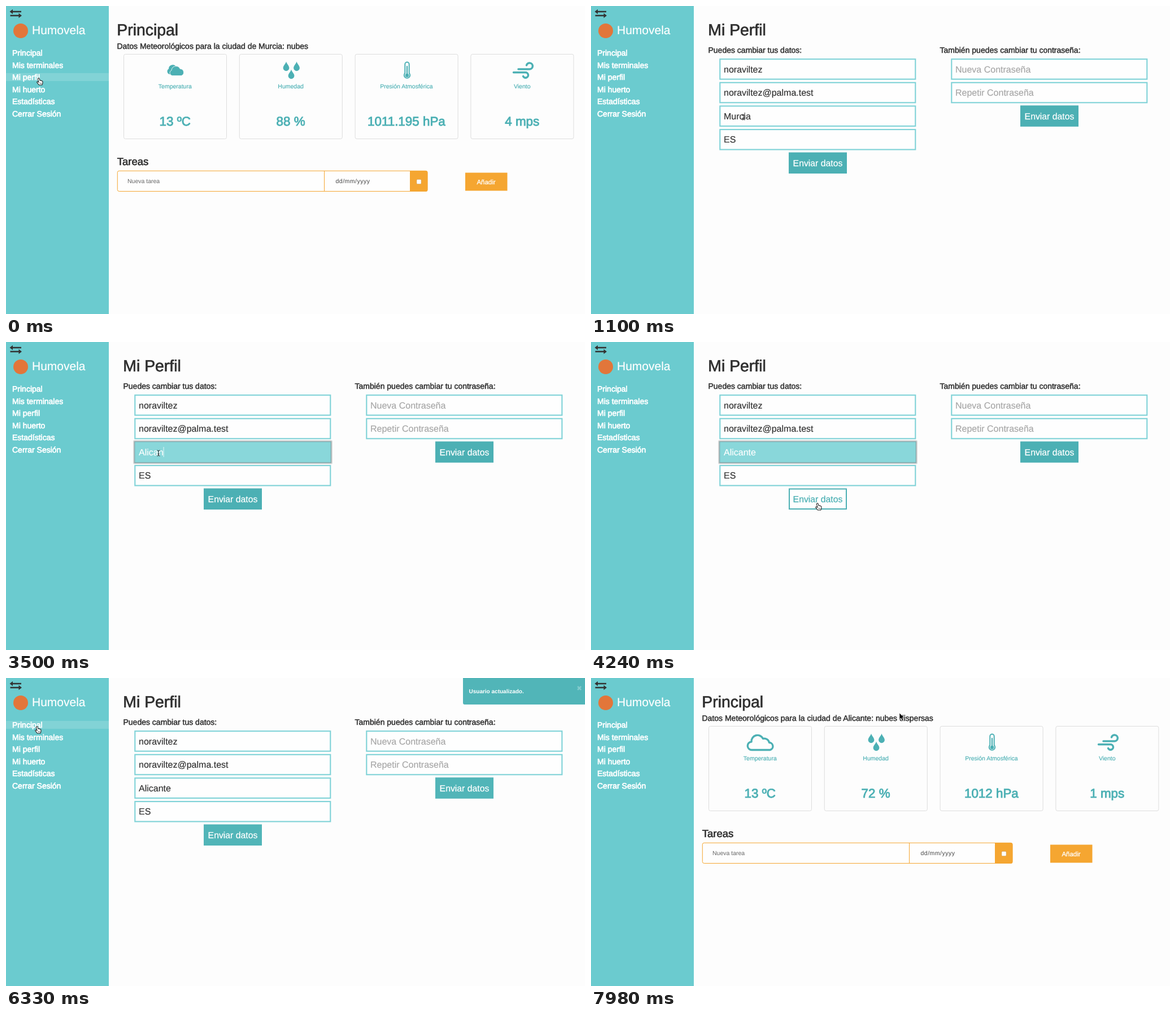
An HTML page for the animation above (8000 ms loop, 1025 by 546 pixels).

```html
<!DOCTYPE html>
<html lang="es">
<head>
<meta charset="utf-8">
<title>Panel</title>
<style>
  html, body { margin: 0; width: 100%; height: 100%; overflow: hidden; background: #fdfdfd; }
  svg { display: block; width: 100vw; height: 100vh; }
  text { font-family: "Liberation Sans", Arial, sans-serif; white-space: pre; text-rendering: geometricPrecision; }
</style>
</head>
<body>
<svg id="stage" viewBox="0 0 1025 546"></svg>
<script>
const LOOP = 8000;
const TEAL = '#4cb0b4', ORANGE = '#f5a631', DARK = '#2f2f2f', EDGE = '#7fd2d7';
const stage = document.getElementById('stage');
const pen = document.createElement('canvas').getContext('2d');
pen.font = '16px "Liberation Sans", Arial, sans-serif';

// Cursor stops: time, x, y, shape
const CURSOR = [
  [0, 54, 127, 'hand'],
  [510, 72, 134, 'arrow'], [660, 122, 149, 'arrow'], [810, 190, 169, 'arrow'],
  [950, 246, 189, 'beam'], [1100, 270, 197, 'beam'],
  [3640, 279, 206, 'beam'], [3790, 310, 240, 'beam'], [3940, 340, 261, 'arrow'],
  [4090, 385, 279, 'hand'], [4240, 397, 285, 'hand'],
  [5590, 345, 240, 'arrow'], [5740, 255, 152, 'arrow'], [5890, 165, 74, 'arrow'],
  [6040, 102, 33, 'arrow'], [6180, 64, 62, 'arrow'], [6330, 51, 85, 'hand'],
  [7530, 62, 82, 'hand'], [7680, 170, 70, 'arrow'], [7830, 390, 58, 'arrow'],
  [7980, 546, 62, 'arrow']
];
const SHAPES = {
  arrow: '<path d="M0 0V11.6L2.7 9.1L4.7 13.6L6.8 12.7L4.9 8.3H8.6Z" fill="#000" stroke="#fff" stroke-width=".7"/>',
  hand: '<path d="M3 1.3Q4.3 .2 5 1.6L6 5Q7.4 4.4 7.9 5.4Q9.2 4.9 9.6 6Q10.8 5.8 10.9 7.2V9.8L9.8 13H4.4L1 8.7Q.4 7.2 1.8 7.1L4 8.2L2.4 2.6Q2.2 1.8 3 1.3Z" fill="#fff" stroke="#222" stroke-width="1.1"/><path d="M6.3 9v2.4M8.3 9v2.4" stroke="#222" stroke-width=".7"/>',
  beam: '<path d="M-2.5 -5Q0 -5 0 -3.5Q0 -5 2.5 -5M0 -4V4M-2.5 5Q0 5 0 3.5Q0 5 2.5 5M-1.5 1.5H1.5" fill="none" stroke="#222"/>'
};

const last = (list, t) => list.filter(k => k[0] <= t).pop();

function rect(x, y, w, h, fill, extra = '') {
  return `<rect x="${x}" y="${y}" width="${w}" height="${h}" fill="${fill}" ${extra}/>`;
}
// heavy: stroke width that thickens the regular face
function text(s, x, y, size, fill, { heavy = 0, mid = false, extra = '' } = {}) {
  return `<text x="${x}" y="${y}" font-size="${size}" fill="${fill}"` +
    (heavy ? ` stroke="${fill}" stroke-width="${heavy}"` : '') +
    (mid ? ' text-anchor="middle"' : '') + ` ${extra}>${s}</text>`;
}

function sidebar(hover) {
  const items = ['Principal', 'Mis terminales', 'Mi perfil', 'Mi huerto', 'Estadísticas', 'Cerrar Sesión'];
  return rect(0, 0, 182, 546, '#6bcbcf') +
    '<path d="M6.500 10L12 5.800V8.7H27V11.3H12V14.2ZM28 17L22.500 12.800V15.7H7.500V18.3H22.500V21.2Z" fill="#333"/>' +
    '<circle cx="26" cy="44" r="13" fill="#e2763a"/>' +
    text('Humovela', 46, 50, 21, '#fff', { heavy: .2 }) +
    (hover >= 0 ? rect(0, 76 + 21.5 * hover, 182, 14, '#82d3d6') : '') +
    items.map((s, i) => text(s, 11, 88 + 21.5 * i, 14, '#fff', { heavy: .7 })).join('');
}

const drop = (x, y) =>
  `<path transform="translate(${x} ${y})" d="M0 0C1 4 5.4 7.5 5.4 11.3A5.4 5.4 0 0 1 -5.4 11.3C-5.4 7.5 -1 4 0 0Z" fill="${TEAL}"/>`;
const line = (d, w) =>
  `<path d="${d}" fill="none" stroke="${TEAL}" stroke-width="${w}" stroke-linecap="round" stroke-linejoin="round"/>`;

const ICONS = {
  clouds: `<path d="M289.500 121A5.200 5.200 0 0 1 288 111.500A7.200 7.200 0 0 1 301.500 108V121Z" fill="${TEAL}"/>` +
    `<path d="M294 123.500A5 5 0 0 1 293 114A8 8 0 0 1 308.300 111.500A6.200 6.200 0 0 1 310.500 123.500Z" fill="${TEAL}" stroke="#fdfdfd" stroke-width=".8"/>`,
  cloud: line('M285 127.500A7.200 7.200 0 0 1 284 113A10.800 10.800 0 0 1 304.500 107.500A9 9 0 0 1 315.500 114.500A6.600 6.600 0 0 1 317 127.500Z', 3.4),
  drops: drop(496, 98.5) + drop(514.500, 98.5) + drop(505, 112.5),
  thermo: line('M706.300 119V103.200A3.700 3.700 0 0 1 713.700 103.200V119A5.200 5.200 0 1 1 706.300 119Z', 2) +
    `<circle cx="710" cy="123" r="3.300" fill="${TEAL}"/>` + line('M710 107V122', 2.2),
  wind: line('M907 112H926.500A5.500 5.500 0 1 0 921.500 105', 3.5) +
    line('M898.500 117.800H919.500A4.700 4.700 0 1 1 915.500 124.500', 3.5)
};

function card(i, h, icon, label, value) {
  const x = 208.5 + 204.8 * i, cx = x + 90.8;
  return rect(x, 85.5, 182, h, '#fdfdfd', 'rx="3" stroke="#ddd"') +
    (icon ? ICONS[icon] : '') +
    text(label, cx, icon ? 146 : 104, 10.5, TEAL, { heavy: .15, mid: true }) +
    (value ? text(value, cx, 211.5, 22.4, TEAL, { heavy: .9, mid: true }) : '');
}

function tasks(dy) {
  return `<g transform="translate(0 ${dy})">` +
    text('Tareas', 196.800, 281.5, 18.5, DARK, { heavy: .65 }) +
    rect(197.3, 292.3, 548.5, 36.2, '#fefefe', `rx="3" stroke="${ORANGE}"`) +
    `<path d="M563.500 292V329" stroke="${ORANGE}"/>` +
    `<path d="M715 292H743Q746.500 292 746.500 295V326Q746.500 329 743 329H715Z" fill="${ORANGE}"/>` +
    rect(727, 307.5, 8, 8, '#fff', 'rx="1.5" stroke="#bda27a" stroke-width=".5"') +
    text('Nueva tarea', 215, 314, 10.5, '#666') +
    text('dd/mm/yyyy', 583.500, 314, 10.5, '#444', { extra: 'letter-spacing=".5"' }) +
    rect(813, 295.5, 74.5, 32, ORANGE) +
    text('Añadir', 850, 315.500, 11.5, '#fff', { heavy: .3, mid: true }) + '</g>';
}

const title = (s, x) => text(s, x, 52, 28.4, DARK, { heavy: .7 });
const caption = (s, x, y) => text(s, x, y, 14, DARK, { heavy: .5 });

function home(city, sky, values, icon) {
  const full = values.length > 0, h = full ? 150 : 118;
  return title('Principal', 196.3) +
    caption(`Datos Meteorológicos para la ciudad de ${city}: ${sky}`, 196.5, 76) +
    card(0, full ? 150 : 75.5, icon, 'Temperatura', values[0]) +
    card(1, h, 'drops', 'Humedad', values[1]) +
    card(2, h, 'thermo', 'Presión Atmosférica', values[2]) +
    card(3, h, 'wind', 'Viento', values[3]) +
    tasks(full ? 0 : -32);
}

const ring = (x, y, w, h) =>
  rect(x - 1, y - 1, w + 2, h + 2, 'none', 'rx="1" stroke="#999" stroke-opacity=".35" stroke-width="3"') +
  rect(x, y, w, h, 'none', 'stroke="#8fa9ab" stroke-width="1.500"');

function field(x, row, s, ink) {
  const y = 94.2 + 41.6 * row;
  return rect(x, y, 346, 35.5, '#fefefe', `stroke="${EDGE}" stroke-width="2.1"`) +
    text(s, x + 6.700, y + 23.300, 16, ink, { heavy: .15 });
}
function button(x, y, fill, hover, focus) {
  return (hover ? rect(x + 1, y + 1, 101, 35.500, '#fefefe', `stroke="${TEAL}" stroke-width="2"`)
                : rect(x, y, 103, 37.5, fill)) +
    (focus ? ring(x, y, 103, 37.5) : '') +
    text('Enviar datos', x + 51.5, y + 24.700, 15.8, hover ? TEAL : '#fff', { heavy: .25, mid: true });
}

function cityField(t) {
  const typed = 'Alicante'.slice(0, t < 2900 ? 1 : 2 + Math.floor((t - 2895) / 149));
  const value = t < 2300 ? 'Murcia' : typed;
  if (t < 1400 || t >= 4690) return field(228.300, 2, value, DARK);
  const x = 235, end = pen.measureText(value).width, half = t < 1550;
  const caret = (t >= 2300 && t < 2600) || (t >= 2900 && t < 4090);
  return rect(228, 177, 347, 36.5, half ? '#c0e9eb' : '#89d7da', `stroke="${EDGE}" stroke-width="2"`) +
    ring(227.500, 176.5, 348, 37.5) +
    (!half && t < 2300 ? rect(x, 186, end, 18, '#a9cfee') : '') +
    text(value, x, 200.7, 16, half ? '#777' : '#fff', { heavy: .15 }) +
    (caret ? rect(x + end, 186, 1, 18, '#e6f7f7') : '');
}

function profile(t) {
  const done = t >= 5140, fill = done ? '#51b5b8' : TEAL;
  return title('Mi Perfil', 207.3) +
    caption('Puedes cambiar tus datos:', 207.5, 83) +
    caption('También puedes cambiar tu contraseña:', 617.500, 83) +
    field(228.300, 0, 'noraviltez', DARK) +
    field(228.300, 1, 'noraviltez@palma.test', DARK) +
    field(228.300, 3, 'ES', DARK) + cityField(t) +
    button(350, 259.5, fill, t >= 4090 && !done, t >= 4690 && !done) +
    field(638.300, 0, 'Nueva Contraseña', '#a5a5a5') +
    field(638.300, 1, 'Repetir Contraseña', '#a5a5a5') +
    button(760, 176.3, fill) +
    (done ? rect(809, -4, 220, 51, fill, 'rx="3"') +
      text('Usuario actualizado.', 819.500, 26.5, 10, '#fff', { extra: 'font-weight="700"' }) +
      '<path d="M1012 15L1018 21M1018 15L1012 21" stroke="#82cbcd" stroke-width="2.500"/>' : '');
}

function scene(t) {
  const [, cx, cy, shape] = last(CURSOR, t);
  const hover = last([[0, 2], [150, -1], [6330, 0], [7080, -1], [7530, 0], [7680, -1]], t)[1];
  const page =
    t < 150 ? home('Murcia', 'nubes', ['13 ºC', '88 %', '1011.195 hPa', '4 mps'], 'clouds') :
    t < 7080 ? profile(t) :
    t < 7380 ? home('Alicante', '', []) :
    home('Alicante', 'nubes dispersas', ['13 ºC', '72 %', '1012 hPa', '1 mps'], 'cloud');
  return rect(0, 0, 1025, 546, '#fdfdfd') + sidebar(hover) + page +
    `<g transform="translate(${cx} ${cy})">${SHAPES[shape]}</g>`;
}

let shown = '';
const start = performance.now();
function tick() {
  const next = scene((performance.now() - start) % LOOP);
  if (next !== shown) stage.innerHTML = shown = next;
  requestAnimationFrame(tick);
}
tick();
</script>
</body>
</html>
```
